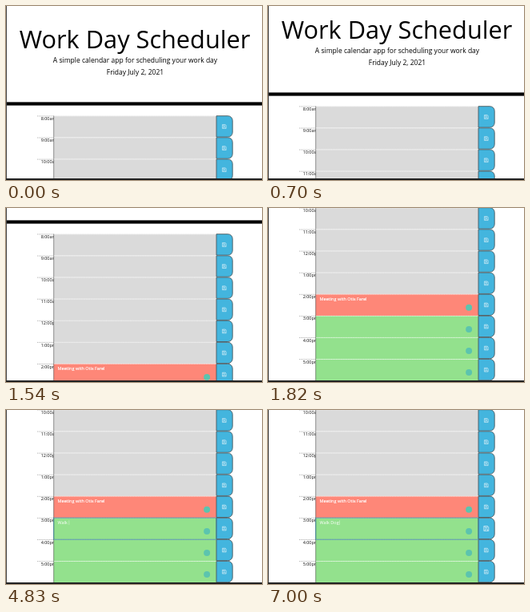
Recreate the animation shown at these times as an HTML page. Size 320 by 218 pixels, loop 7.07 s.

```html
<!DOCTYPE html>
<html lang="en">
<head>
<meta charset="utf-8">
<title>Work Day Scheduler</title>
<style>
  html, body { margin: 0; width: 100%; height: 100%; overflow: hidden; background: #fff; }
  svg { display: block; width: 100vw; height: 100vh; }
  text { font-family: "Open Sans", "Noto Sans", sans-serif; fill: #000; white-space: pre; }
  .mid { text-anchor: middle; }
  .title { font-size: 30.7px; }
  .lead { font-size: 8.53px; }
  .hour { font-size: 5.46px; fill: #111; }
  .note { font-size: 5.5px; fill: #fff; }
  .strong { stroke: #fff; stroke-width: .15; }
  .icon { fill: none; stroke: #d9eff7; stroke-width: .6; }
</style>
</head>
<body>
<svg id="stage" viewBox="0 0 320 218">
  <rect width="320" height="218" fill="#fff"/>
  <g id="page">
    <text class="mid title" x="161" y="53">Work Day Scheduler</text>
    <text class="mid lead" x="161.5" y="71">A simple calendar app for scheduling your work day</text>
    <text class="mid lead" x="161.5" y="86">Friday July 2, 2021</text>
    <rect y="120.4" width="320" height="4.2"/>
  </g>
  <rect width="1" height="218" fill="#444"/>
  <rect y="216" width="320" height="2" fill="#222"/>
</svg>
<script>
const LOOP = 7070, TICK = 70;
const TOP = 137.5, ROW = 27.1, LEFT = 60, RIGHT = 263;
const NOW = 6, EDITED = 7;
const page = document.getElementById('page');

function add(tag, attrs, parent = page) {
  const el = document.createElementNS('http://www.w3.org/2000/svg', tag);
  for (const key in attrs) el.setAttribute(key, attrs[key]);
  return parent.appendChild(el);
}

function addText(cls, x, y, value) {
  const el = add('text', { class: cls, x, y });
  el.textContent = value;
  return el;
}

function addRow(i) {
  const y = TOP + i * ROW, hour = 8 + i;
  const fill = i < NOW ? '#dadada' : i === NOW ? '#fe8778' : '#93e18d';

  add('path', { d: `M39 ${y + .4}H60`, stroke: '#666', 'stroke-width': .5, 'stroke-dasharray': '1.2 .9' });
  addText('hour', 43.7, y + 5.5, `${hour > 12 ? hour - 12 : hour}:00${hour < 12 ? 'am' : 'pm'}`);
  add('rect', { x: LEFT - .5, y, width: RIGHT - LEFT + .5, height: ROW + .1, fill });
  add('path', { d: `M${LEFT} ${y + .3}H${RIGHT}`, stroke: '#fff', 'stroke-width': .7, 'stroke-dasharray': '1.4 .5' });
  add('path', { d: `M${LEFT - .3} ${y}v${ROW}`, stroke: '#555', 'stroke-width': .6 });
  if (i >= NOW) add('circle', { cx: 251.1, cy: y + 16.9, r: 4, fill: '#5cc4ae' });

  add('rect', { x: RIGHT, y, width: 22, height: ROW, fill: '#fff' });
  add('path', {
    d: `M263 ${y + .2}h14.4a5.8 5.8 0 0 1 5.8 5.8v14.8a5.8 5.8 0 0 1 -5.8 5.8h-14.4z`,
    fill: '#43b5de', stroke: '#4a5256', 'stroke-width': .85
  });
  return add('path', {
    class: 'icon', transform: iconPlace(y, 1),
    d: 'M-2.4 -2.4H1.4L2.4 -1.4V2.4H-2.4ZM-1.3 -2.4V-.8H1V-2.4M-1.2 2.4V.6H1.2V2.4'
  });
}

function iconPlace(y, scale) {
  return `translate(272.8 ${y + 13.5}) scale(${scale})`;
}

const icons = Array.from({ length: 10 }, (_, i) => addRow(i));
const editY = TOP + EDITED * ROW;
addText('note strong', 64.6, TOP + NOW * ROW + 8, 'Meeting with Otis Farel');
const note = addText('note', 64.6, editY + 8, '');
const caret = add('rect', { y: editY + 3.3, width: .5, height: 5.6, fill: '#fff', opacity: .7 });
const ring = add('rect', {
  x: LEFT - .3, y: editY + .1, width: RIGHT - LEFT + .2, height: ROW,
  fill: 'none', stroke: '#3f86a0', 'stroke-width': .9
});

// [time, scroll offset]
const SCROLL = [[0, 0], [560, 9], [980, 18], [1260, 18], [1400, 48], [1540, 105], [1680, 162], [1820, 192.2]];
const KEYS = [3920, 4060, 4200, 4340, 4620, 4970, 5180, 5390];
const FOCUS = 3080, CARET = 3570, PRESS = 6930;

function scrollAt(t) {
  for (let i = 1; i < SCROLL.length; i++) {
    const [t0, a] = SCROLL[i - 1], [t1, b] = SCROLL[i];
    if (t < t1) return a + (b - a) * (t - t0) / (t1 - t0);
  }
  return SCROLL[SCROLL.length - 1][1];
}

const show = (el, on) => el.setAttribute('visibility', on ? 'visible' : 'hidden');

function draw(ms) {
  const t = Math.floor((ms % LOOP) / TICK) * TICK;
  page.setAttribute('transform', `translate(0 ${-scrollAt(t)})`);

  const typed = 'Walk Dog'.slice(0, KEYS.filter(k => k <= t).length);
  if (note.textContent !== typed) note.textContent = typed;
  caret.setAttribute('x', 64.9 + (typed ? note.getComputedTextLength() : 0));
  show(caret, t >= CARET);
  show(ring, t >= FOCUS);
  icons[EDITED].setAttribute('transform', iconPlace(editY, t >= PRESS ? 1.25 : 1));
}

const start = performance.now();
function frame() {
  draw(performance.now() - start);
  requestAnimationFrame(frame);
}
frame();
</script>
</body>
</html>
```
